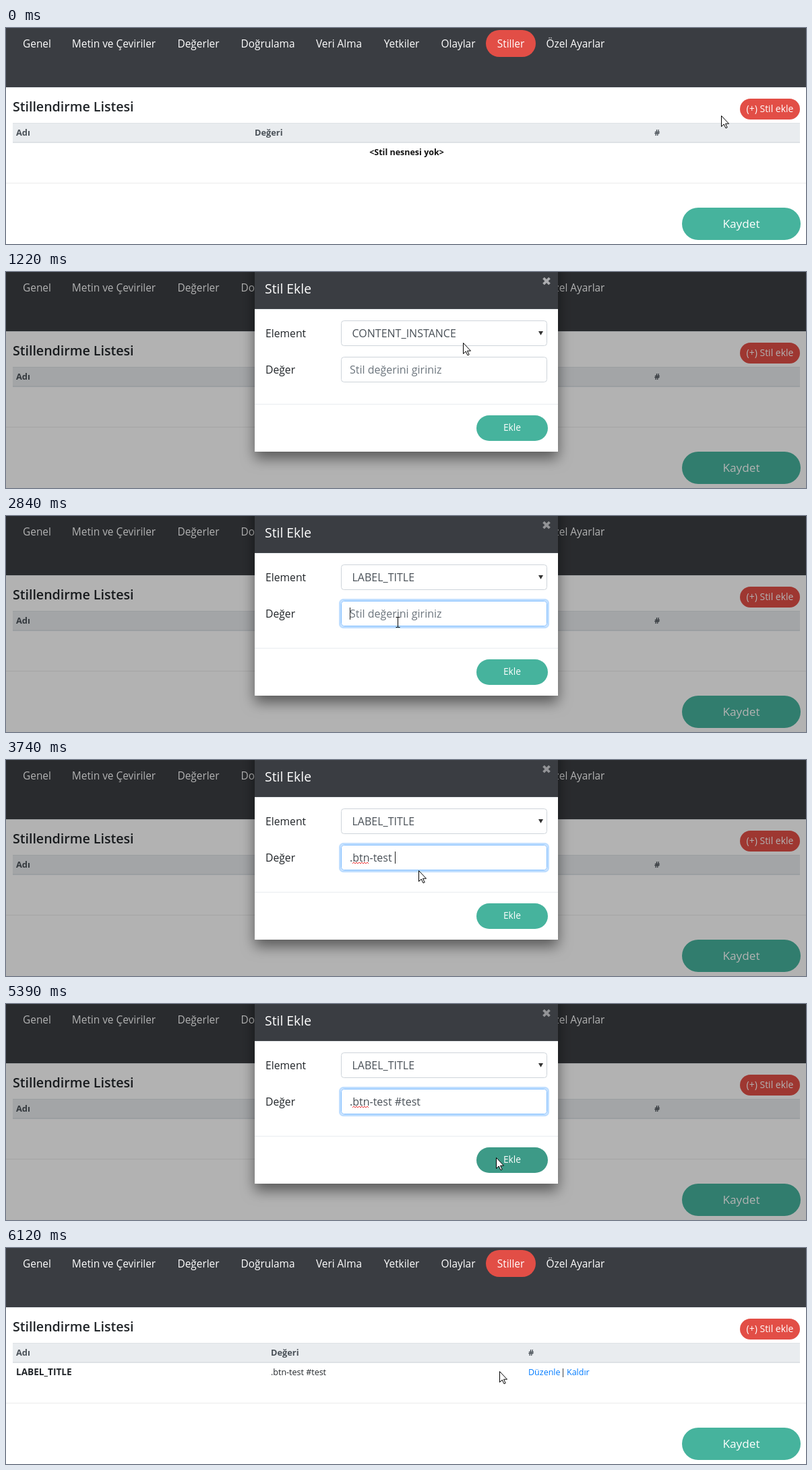
Animation, 1187 px wide and 321 px high, one loop 6180 ms. Source, as an HTML page:

```html
<!DOCTYPE html>
<html lang="tr">
<head>
<meta charset="utf-8">
<title>Stil Ekle</title>
<style>
  html, body { margin: 0; width: 100%; height: 100%; overflow: hidden; background: #fff; }
  svg { display: block; width: 100%; height: 100%; font-family: "Open Sans", "Noto Sans", sans-serif; }
  text { white-space: pre; }
  .medium { font-weight: 500; }
  .mid { text-anchor: middle; }
  .nav { font-size: 15.4px; fill: #fff; }
  .head { font-size: 12.8px; font-weight: 700; fill: #495057; }
  .cell { font-size: 12.5px; fill: #212529; }
  .label { font-size: 15.7px; fill: #212529; }
  .value { font-size: 16px; fill: #495057; }
  .field { fill: #fff; stroke: #ced4da; }
  .field.focus { stroke: #80bdff; }
  .glow { fill: none; stroke: #bfdeff; stroke-width: 3; }
  .dark { fill: #3a3d42; }
  .red { fill: #e24e46; }
  .green { fill: #46b39d; }
</style>
</head>
<body>
<svg viewBox="0 0 1187 321">
  <filter id="shadow" x="-20%" y="-20%" width="140%" height="140%">
    <feDropShadow dx="0" dy="10" stdDeviation="10" flood-color="#000" flood-opacity=".5"/>
  </filter>

  <rect class="dark" width="1187" height="88"/>
  <rect y="88" width="1187" height="1" fill="#e9ecef"/>
  <rect class="red" x="712" y="3" width="74" height="40" rx="20"/>
  <g id="nav" class="nav mid"></g>

  <text x="10" y="124" font-size="19.6" font-weight="600" fill="#212529">Stillendirme Listesi</text>
  <rect class="red" x="1089" y="105" width="89" height="31" rx="15.5"/>
  <text class="medium mid" x="1133.5" y="125" font-size="14" fill="#fff">(+) Stil ekle</text>

  <rect x="10" y="141" width="1168" height="30" fill="#dee2e6"/>
  <rect x="10" y="142" width="1168" height="27" fill="#e9ecef"/>
  <text class="head" x="15" y="160">Adı</text>
  <text class="head" id="valueHead" y="160">Değeri</text>
  <text class="head" id="actionHead" y="160">#</text>
  <text class="mid" id="emptyRow" x="594.5" y="189" font-size="12.5" font-weight="700" fill="#111">&lt;Stil nesnesi yok&gt;</text>
  <g id="styleRow" class="cell">
    <text x="15" y="189" font-size="13.6" font-weight="700">LABEL_TITLE</text>
    <text x="393" y="189">.btn-test #test</text>
    <text x="775" y="189" fill="#007bff">Düzenle</text>
    <text x="823" y="189">|</text>
    <text x="832" y="189" fill="#007bff">Kaldır</text>
  </g>
  <rect y="230" width="1187" height="1" fill="#ebebeb"/>
  <rect class="green" x="1003" y="267" width="176" height="48" rx="24"/>
  <text class="mid" x="1091" y="297" font-size="17.2" fill="#fff">Kaydet</text>

  <rect id="backdrop" width="1187" height="321"/>

  <g id="modal">
    <rect filter="url(#shadow)" x="369" y="-60" width="450" height="327" fill="#fff"/>
    <rect class="dark" x="369" width="450" height="55"/>
    <rect x="369" y="55" width="450" height="1" fill="#e9ecef"/>
    <text x="384" y="32" font-size="19.4" fill="#fff">Stil Ekle</text>
    <path id="close" d="M797.5 9l9 9m0-9l-9 9" stroke="#fff" stroke-width="3.8"/>
    <text class="label" x="385" y="97">Element</text>
    <text class="label" x="385" y="151">Değer</text>

    <rect class="glow" id="selectGlow" x="495.5" y="70.5" width="309" height="41" rx="5"/>
    <rect class="field" id="select" x="497.5" y="72.5" width="305" height="37" rx="4"/>
    <text class="value" id="selected" x="513.5" y="97"></text>
    <path d="M790 88h7l-3.5 6z" fill="#333"/>

    <rect class="glow" id="inputGlow" x="495.5" y="124.5" width="309" height="41" rx="5"/>
    <rect class="field" id="input" x="497.5" y="126.5" width="305" height="37" rx="4"/>
    <text class="value" id="typed" x="510" y="151"></text>
    <path id="squiggle" d="M514 154l2-2 2 2 2-2 2 2 2-2 2 2 2-2 2 2 2-2 2 2 2-2 2 2" fill="none" stroke="#e33"/>
    <rect id="caret" y="136" width="1" height="18" fill="#222"/>

    <rect x="369" y="196" width="450" height="1" fill="#e9ecef"/>
    <rect id="add" x="698" y="213" width="106" height="38" rx="19"/>
    <text class="medium mid" x="751" y="236" font-size="13.8" fill="#fff">Ekle</text>
    <g id="dropdown"></g>
  </g>

  <path id="arrow" d="M.5.5V16.5L4.2 13 7 18.8 9.2 17.8 6.5 12.2H11.5z" fill="#fff" stroke="#000"/>
  <path id="beam" d="M-3-7.5h2.5l.5.5.5-.5H3M0-7V7M-3 7.5h2.5l.5-.5.5.5H3" fill="none" stroke="#000"/>
</svg>
<script>
const LOOP = 6180;
// Bursts of screen updates: first update, last update, count
const BURSTS = [
  [100, 620, 7], [720, 1320, 7], [1420, 2020, 7], [2120, 2640, 7], [2740, 2840, 2], [2980, 3550, 11],
  [3620, 4180, 8], [4250, 4790, 9], [4890, 5490, 7], [5520, 6120, 7]
];
// Pointer path: time, x, y
const POINTER = [
  [100, 1061, 130], [500, 1121, 133], [720, 1121, 133], [1220, 678, 105], [1420, 650, 93], [1620, 650, 93],
  [2020, 600, 138], [2400, 600, 138], [2740, 581, 158], [3620, 581, 158], [3900, 690, 179], [4180, 714, 165],
  [4250, 714, 165], [4580, 680, 154.5], [4790, 680, 154.5], [5390, 727, 228], [5520, 727, 228], [6020, 732, 183]
];
const BACKDROP = [[540, 0], [620, .15], [720, .3], [5390, .3], [5490, .02], [5520, 0]];
const OPTIONS = ["CONTENT_INSTANCE", "LABEL_TITLE", "LABEL_VALUE"];
const VALUE = ".btn-test #test";

const $ = id => document.getElementById(id);
const show = (id, on) => $(id).style.display = on ? "" : "none";
const set = (id, name, value) => $(id).setAttribute(name, value);
const label = (id, text) => { if ($(id).textContent !== text) $(id).textContent = text; };
const clamp = (v, lo, hi) => Math.max(lo, Math.min(hi, v));

function along(keys, t) {
  const next = keys.findIndex(k => k[0] > t);
  if (next === 0) return keys[0].slice(1);
  if (next < 0) return keys[keys.length - 1].slice(1);
  const a = keys[next - 1], b = keys[next], p = (t - a[0]) / (b[0] - a[0]);
  return a.slice(1).map((v, i) => v + (b[i + 1] - v) * p);
}

function lastUpdate(t) {
  const burst = BURSTS.filter(b => b[0] <= t).pop();
  if (!burst) return 0;
  const [start, end, count] = burst, gap = (end - start) / (count - 1);
  return start + gap * clamp(Math.floor((t - start) / gap + 1e-6), 0, count - 1);
}

function typedLength(t) {
  if (t < 2980) return 0;
  if (t < 4250) return clamp(1 + Math.floor((t - 2980) / 57 + 1e-6), 1, 10);
  return clamp(11 + Math.floor((t - 4250) / 67.5 + 1e-6), 11, VALUE.length);
}

$("nav").innerHTML = [
  ["Genel", 46], ["Metin ve Çeviriler", 160], ["Değerler", 285.5], ["Doğrulama", 388.5], ["Veri Alma", 494],
  ["Yetkiler", 587], ["Olaylar", 671], ["Stiller", 749], ["Özel Ayarlar", 845]
].map(([name, x]) => `<text x="${x}" y="29">${name}</text>`).join("");

$("dropdown").innerHTML = '<rect x="497.5" y="110.5" width="305" height="62" fill="#fff" stroke="#8a9096"/>' +
  OPTIONS.map((name, i) => `<rect id="option${i}" x="498" y="${111 + i * 20.3}" width="304" height="20.3"/>
    <text id="name${i}" class="value" x="513.5" y="${127 + i * 20.3}">${name}</text>`).join("");

function draw(time) {
  const t = lastUpdate(time);
  const [x, y] = along(POINTER, t);
  const saved = t >= 5490, focused = t >= 2740, selecting = t >= 1420 && !focused;

  set("valueHead", "x", saved ? 393 : 369);
  set("actionHead", "x", saved ? 775 : 962);
  show("emptyRow", !saved);
  show("styleRow", saved);
  set("backdrop", "opacity", along(BACKDROP, t)[0]);
  show("modal", t >= 620 && !saved);
  set("close", "opacity", t < 1420 ? .58 : .45);

  show("selectGlow", selecting);
  $("select").classList.toggle("focus", selecting);
  label("selected", OPTIONS[t < 2440 ? 0 : 1]);
  show("dropdown", t >= 1520 && t < 2440);
  const hovered = y > 131 ? 1 : 0;
  OPTIONS.forEach((_, i) => {
    set("option" + i, "fill", i === hovered ? "#1e90ff" : "#fff");
    $("name" + i).style.fill = i === hovered ? "#fff" : "";
  });

  const length = typedLength(t);
  show("inputGlow", focused);
  $("input").classList.toggle("focus", focused);
  label("typed", length ? VALUE.slice(0, length) : "Stil değerini giriniz");
  $("typed").style.fill = length ? "" : "#6c757d";
  show("squiggle", length >= 10);
  const lastKey = t >= 4520 ? 4520 : t >= 4250 ? t : t >= 3550 ? 3550 : t >= 2980 ? t : 2740;
  show("caret", focused && (t - lastKey) % 1000 < 500);
  set("caret", "x", Math.round(510 + (length && !saved ? $("typed").getComputedTextLength() : 0)));

  const overAdd = x >= 698 && x <= 804 && y >= 213 && y <= 251;
  set("add", "fill", overAdd ? "#3d9a87" : "#46b39d");

  const overInput = t > 2600 && !saved && y > 126 && y < 164;
  show("beam", overInput);
  show("arrow", !overInput);
  if (overInput) set("beam", "transform", `translate(${Math.round(x) + .5} ${Math.round(y)})`);
  else set("arrow", "transform", `translate(${Math.round(x)} ${Math.round(y)})`);
}

const began = performance.now();
function tick() {
  draw((performance.now() - began) % LOOP);
  requestAnimationFrame(tick);
}
tick();
</script>
</body>
</html>
```
